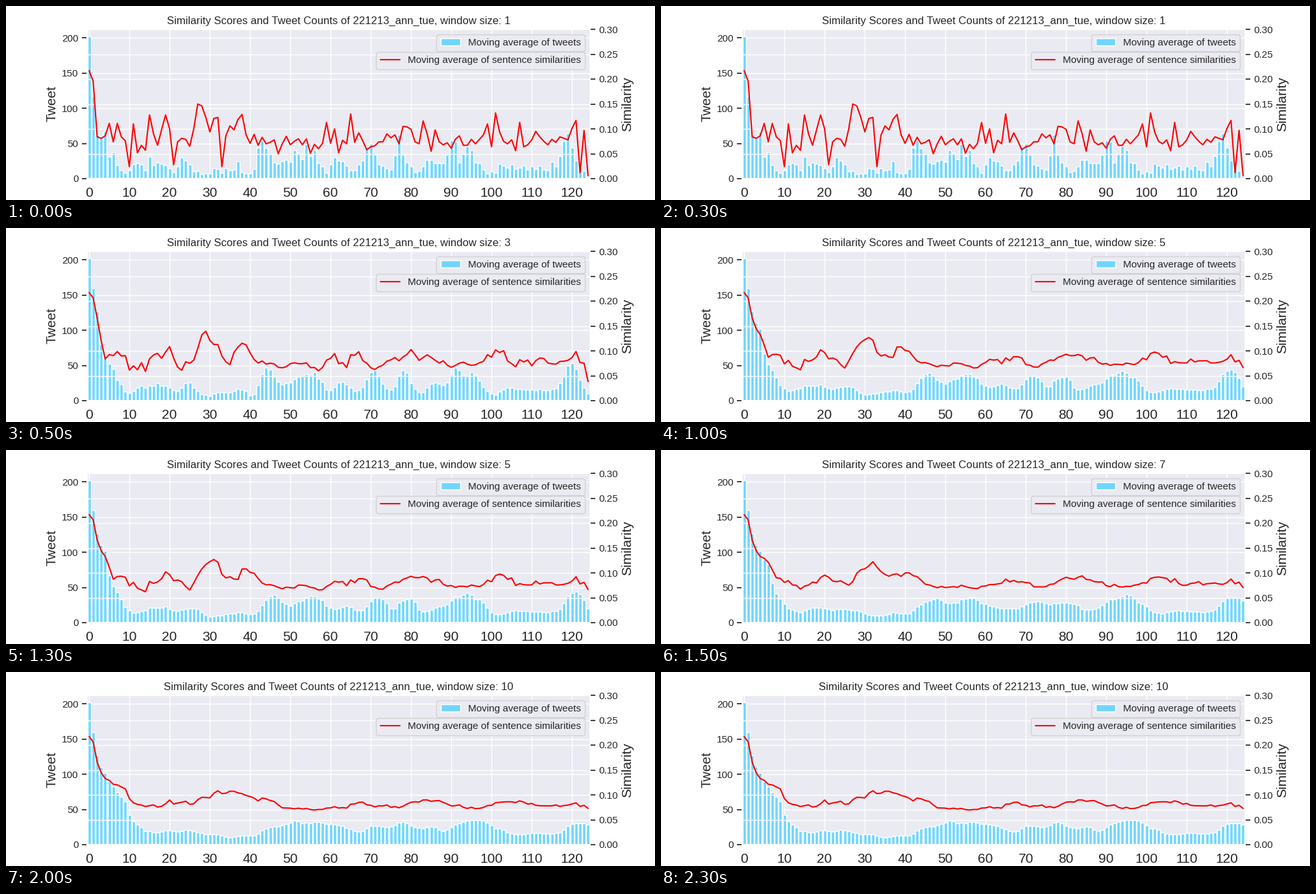
A matplotlib script that plays this animation: 1000x300 px, repeating every 2500 ms.

```python
import matplotlib.pyplot as plt
import numpy as np
from matplotlib.animation import FuncAnimation

WINDOWS = [1, 3, 5, 7, 10]
INK = "0.15"

# Tweets per time step and mean sentence similarity (in thousandths).
TWEETS = np.array([
    202, 117, 62, 60, 67, 31, 38, 19, 12, 8, 12, 20, 22, 20, 12, 31, 19, 23,
    21, 19, 15, 9, 17, 30, 26, 20, 10, 11, 6, 7, 7, 15, 14, 8, 15, 12, 13, 25,
    9, 7, 7, 14, 44, 54, 43, 35, 23, 21, 25, 27, 24, 40, 37, 28, 49, 32, 40,
    22, 17, 8, 20, 30, 26, 25, 18, 12, 12, 20, 26, 45, 50, 34, 20, 18, 15, 13,
    33, 62, 34, 23, 17, 9, 11, 17, 27, 27, 22, 22, 22, 34, 54, 52, 23, 35, 46,
    40, 23, 22, 13, 7, 10, 8, 21, 18, 16, 20, 14, 16, 18, 13, 17, 14, 18, 13,
    12, 24, 17, 32, 53, 64, 44, 26, 17, 11, 1])
SIMILARITY = np.array([
    217, 196, 84, 81, 86, 111, 74, 111, 84, 76, 24, 110, 52, 67, 57, 128, 90,
    67, 98, 128, 100, 28, 74, 81, 79, 65, 100, 150, 146, 123, 94, 121, 123, 24,
    87, 106, 98, 119, 129, 88, 71, 89, 67, 83, 70, 73, 78, 50, 70, 85, 68, 75,
    80, 68, 80, 51, 69, 60, 71, 113, 71, 100, 52, 77, 70, 130, 73, 92, 76, 58,
    64, 66, 74, 74, 90, 82, 88, 70, 105, 104, 99, 74, 70, 116, 90, 55, 98, 74,
    68, 72, 61, 79, 86, 67, 67, 79, 70, 79, 88, 110, 64, 132, 94, 75, 70, 78,
    56, 113, 64, 68, 78, 95, 84, 75, 68, 79, 73, 84, 81, 78, 101, 117, 12, 97,
    6]) / 1000

plt.rcParams.update({
    "font.family": "Liberation Sans",
    "font.size": 12,
    "text.color": INK,
    "axes.facecolor": "#EAEAF2",
    "axes.edgecolor": "white",
    "axes.labelcolor": INK,
    "axes.labelsize": 15,
    "axes.titlesize": 12,
    "axes.linewidth": 1.25,
    "axes.grid": True,
    "axes.axisbelow": True,
    "grid.color": "white",
    "grid.linewidth": 1,
    "lines.solid_capstyle": "round",
    "legend.fontsize": 11,
    "xtick.bottom": False,
    "xtick.color": INK,
    "xtick.labelsize": 15,
    "xtick.major.size": 6,
    "ytick.color": INK,
    "ytick.labelsize": 11,
    "ytick.major.size": 6,
    "ytick.major.width": 1.25,
})


def moving_average(values, window):
    """Trailing mean; the first steps use as many values as exist."""
    return [values[max(0, i + 1 - window):i + 1].mean()
            for i in range(len(values))]


steps = np.arange(len(TWEETS))
fig, ax = plt.subplots(figsize=(10, 3), dpi=100)
bars = ax.bar(steps, TWEETS, color="#70d6ff", edgecolor="white", linewidth=1,
              label="Moving average of tweets")
ax.set_xlim(-0.5, len(steps) - 0.5)
ax.set_ylim(0, TWEETS.max() * 1.05)
ax.set_xticks(range(0, len(steps), 10))
ax.set_yticks(range(0, 201, 50))
ax.set_ylabel("Tweet")
ax.legend(loc="upper right")
title = ax.set_title("")

twin = ax.twinx()
line, = twin.plot(steps, SIMILARITY, color="red", linewidth=1.5,
                  label="Moving average of sentence similarities")
twin.set_ylim(0, 0.3)
twin.set_yticks(np.arange(7) * 0.05)
twin.set_ylabel("Similarity")
twin.legend(loc="upper right", bbox_to_anchor=(1, 0.88))


def update(frame):
    window = WINDOWS[frame]
    for bar, height in zip(bars, moving_average(TWEETS, window)):
        bar.set_height(height)
    line.set_ydata(moving_average(SIMILARITY, window))
    title.set_text("Similarity Scores and Tweet Counts of 221213_ann_tue, "
                   f"window size: {window}")
    return [*bars, line, title]


anim = FuncAnimation(fig, update, frames=len(WINDOWS), interval=500,
                     repeat=True, repeat_delay=0)
plt.show()
```
